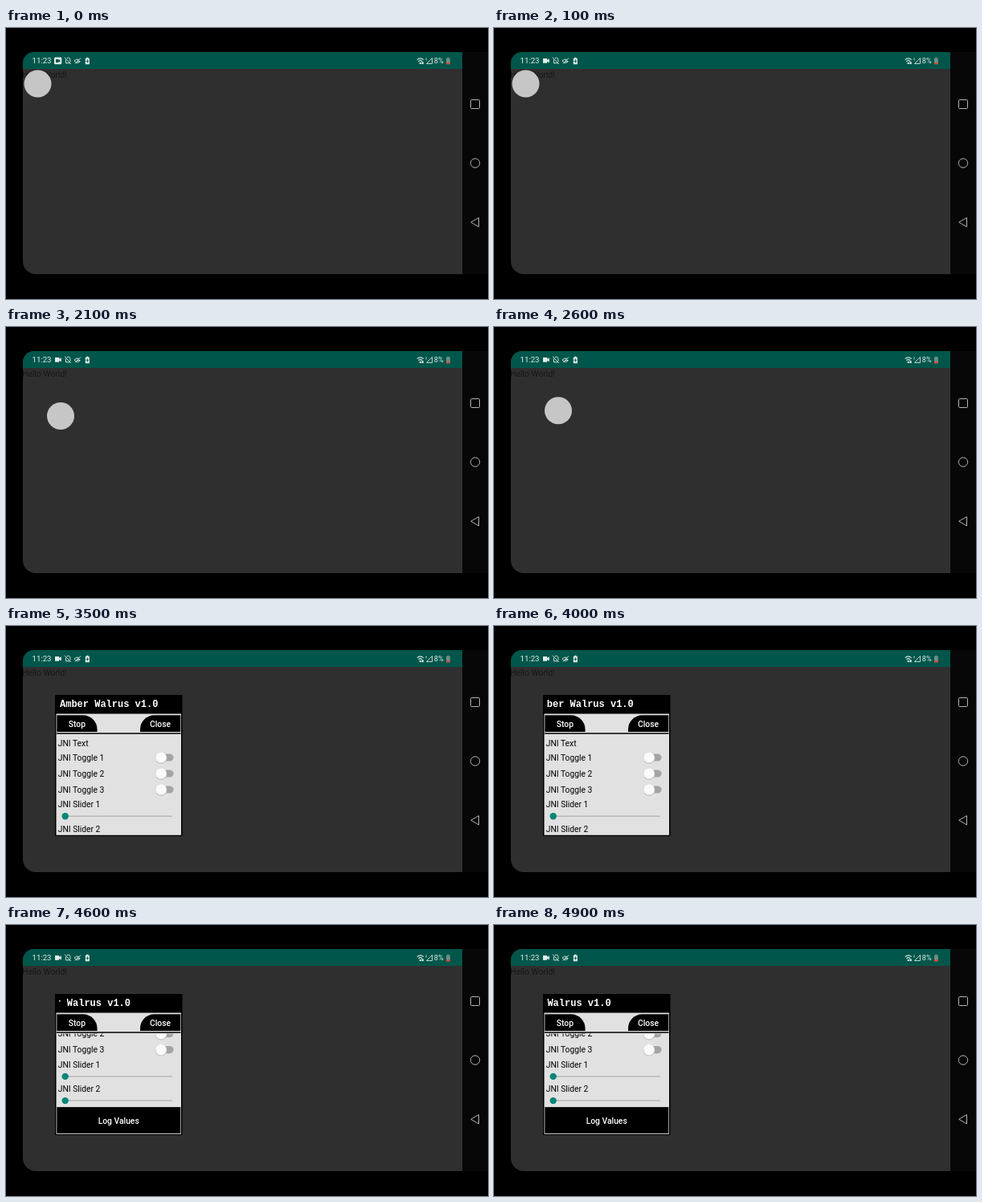
Animation of 600x338 px, one loop 5 s. Source, as an HTML page:

```html
<!DOCTYPE html>
<html lang="en">
<head>
<meta charset="utf-8">
<title>Floating menu</title>
<style>
html, body { margin: 0; width: 100%; height: 100%; overflow: hidden; background: #000; }
svg { display: block; width: 600px; height: 338px; }
text { font: 10.3px Roboto, sans-serif; }
.bold { font-weight: 500; fill: #fff; text-anchor: middle; }
.status { font-size: 9.6px; fill: #e4eeec; }
.title { font: bold 12px "Liberation Mono", "Courier New", monospace; fill: #fff; white-space: pre; }
.icon { fill: none; stroke: #d5e3e0; }
.solid { fill: #e4eeec; }
</style>
</head>
<body>
<svg viewBox="0 0 600 338">
  <defs>
    <clipPath id="screen"><path d="M568 30H35a14 14 0 0 0-14 14V291a16 16 0 0 0 16 16H568Z"/></clipPath>
    <clipPath id="header"><rect x="66" y="87" width="148" height="22"/></clipPath>
    <clipPath id="body"><rect x="62" y="135.5" width="156" height="125"/></clipPath>
    <g id="toggle">
      <rect x="189" y="-4.6" width="19.5" height="9.2" rx="4.6" fill="#a4a4a4"/>
      <circle cx="193" cy=".6" r="7.3" fill="#bdbdbd"/>
      <circle cx="193" r="6.8" fill="#fafafa"/>
    </g>
    <g id="slider">
      <path d="M74 0H207" stroke="#b9b9b9" stroke-width="1.5"/>
      <circle cx="73.7" r="4.2" fill="#028577"/>
    </g>
  </defs>

  <rect width="600" height="338"/>
  <rect x="568" y="30" width="32" height="277" fill="#070707"/>
  <g clip-path="url(#screen)">
    <rect x="21" y="30" width="547" height="277" fill="#302f30"/>
    <rect x="21" y="30" width="547" height="21" fill="#00564a"/>
    <text x="20.3" y="62" fill="#171717">Hello World!</text>
  </g>

  <g fill="none" stroke="#b4b4b4" stroke-linejoin="round">
    <rect x="578.5" y="89.5" width="11" height="11" rx="1"/>
    <circle cx="584" cy="168.5" r="5.7"/>
    <path d="M578.7 242.3L588.5 236.6V248Z"/>
  </g>

  <text class="status" x="32.6" y="44.3">11:23</text>
  <text class="status" x="532.8" y="44.2" style="font-size:9.2px">8%</text>
  <g id="boxed">
    <rect class="solid" x="60" y="36.6" width="9.3" height="8.6" rx="1.5"/>
    <path d="M62 39h3.6v1.3l1.8-1v3.4l-1.8-1V43H62Z" fill="#00564a"/>
  </g>
  <path id="camera" class="solid" d="M61 38h5.2v2l2.6-1.7v5.2l-2.6-1.7v1.9H61Z"/>
  <g class="icon">
    <path d="M73 36.7l7.8 8.3M74.4 39.5v4.3h5M76 37.5q4-1.2 4 3v2"/>
    <path d="M85 41q2.5-3 6-1.5M85 41q3.5 4.5 7 1M86 44.5l7-7M88 41.5h4.5"/>
    <path d="M511.7 39.6q4-3.5 8 0M513.4 41.7q2.3-2 4.6 0" stroke-width="1.2"/>
    <path d="M523.5 44.5h7v-7ZM523 37.5v3" stroke-width=".9"/>
  </g>
  <circle class="solid" cx="515.7" cy="43.9" r="1.2"/>
  <path class="solid" d="M517.5 42.3h2.2v2.8h-2.2Z"/>
  <path class="solid" d="M98.8 37.8h1.4v-1.1h2.2v1.1h1.4v7.5h-5Z"/>
  <path d="M101.3 39.3v4.2M99.7 41.4h3.2" stroke="#00564a"/>
  <path d="M548 37.8h1.3v-1h2.2v1h1.3v7.4h-4.8Z" fill="#6b8f89"/>
  <rect x="548" y="43" width="4.8" height="2.2" fill="#e04a3a"/>

  <circle id="bubble" r="17" fill="#c6c6c6"/>

  <g id="menu">
    <rect x="61" y="86" width="158.5" height="176"/>
    <rect x="62.5" y="109.5" width="155.5" height="151.3" fill="#e1e1e1"/>
    <g clip-path="url(#header)"><text id="title" class="title" x="67" y="101.3">Amber Walrus v1.0</text></g>
    <path d="M63.3 132V111.3H96a17.5 17.5 0 0 1 17.5 17.5V132Z"/>
    <path d="M217.3 132V111.3H184.5a17.5 17.5 0 0 0-17.5 17.5V132Z"/>
    <text class="bold" x="88.4" y="125.6">Stop</text>
    <text class="bold" x="192" y="125.6">Close</text>
    <path d="M63 133.9H217.5" stroke="#000" stroke-width="1.5"/>
    <g clip-path="url(#body)">
      <g id="list">
        <text x="64.8" y="149.9">JNI Text</text>
        <text x="64.8" y="167.9">JNI Toggle 1</text>
        <text x="64.8" y="187.9">JNI Toggle 2</text>
        <text x="64.8" y="207.9">JNI Toggle 3</text>
        <text x="64.8" y="226.3">JNI Slider 1</text>
        <text x="64.8" y="256.6">JNI Slider 2</text>
        <use href="#toggle" y="164"/>
        <use href="#toggle" y="184"/>
        <use href="#toggle" y="204"/>
        <use href="#slider" y="237.3"/>
        <use href="#slider" y="267.5"/>
        <rect x="63.3" y="275.5" width="154" height="32.7"/>
        <text class="bold" x="140.2" y="296">Log Values</text>
      </g>
    </g>
  </g>
</svg>
<script>
const $ = id => document.getElementById(id);
const LOOP = 5000, STEP = 100, OPEN = 3500;

// [time, x, y]: the bubble holds each place until the next
const drag = [
  [0, 39.5, 69.5], [1600, 69.3, 120.3], [1700, 71, 144], [1800, 72, 152.5],
  [2100, 68, 111], [2200, 52, 74], [2300, 84, 60], [2400, 121, 92],
  [2500, 106, 128], [2600, 80, 104.3]
];

const show = (id, on) => $(id).style.display = on ? "" : "none";
const move = (id, x, y) => $(id).setAttribute("transform", `translate(${x} ${y})`);

function scrollAt(t) {
  if (t < 4400) return 0;
  return t < 4500 ? 2 : t < 4600 ? 27 : 48.4;
}

function draw(now) {
  const t = Math.floor(now % LOOP / STEP) * STEP;
  const [, x, y] = drag.findLast(p => p[0] <= t);
  move("bubble", x, y);
  show("bubble", t < OPEN);
  show("menu", t >= OPEN);
  show("boxed", t < STEP);
  show("camera", t >= STEP);
  move("title", -0.0313 * Math.max(0, t - OPEN), 0);
  move("list", 0, -scrollAt(t));
}

const start = performance.now();
function frame() {
  draw(performance.now() - start);
  requestAnimationFrame(frame);
}
frame();
</script>
</body>
</html>
```
